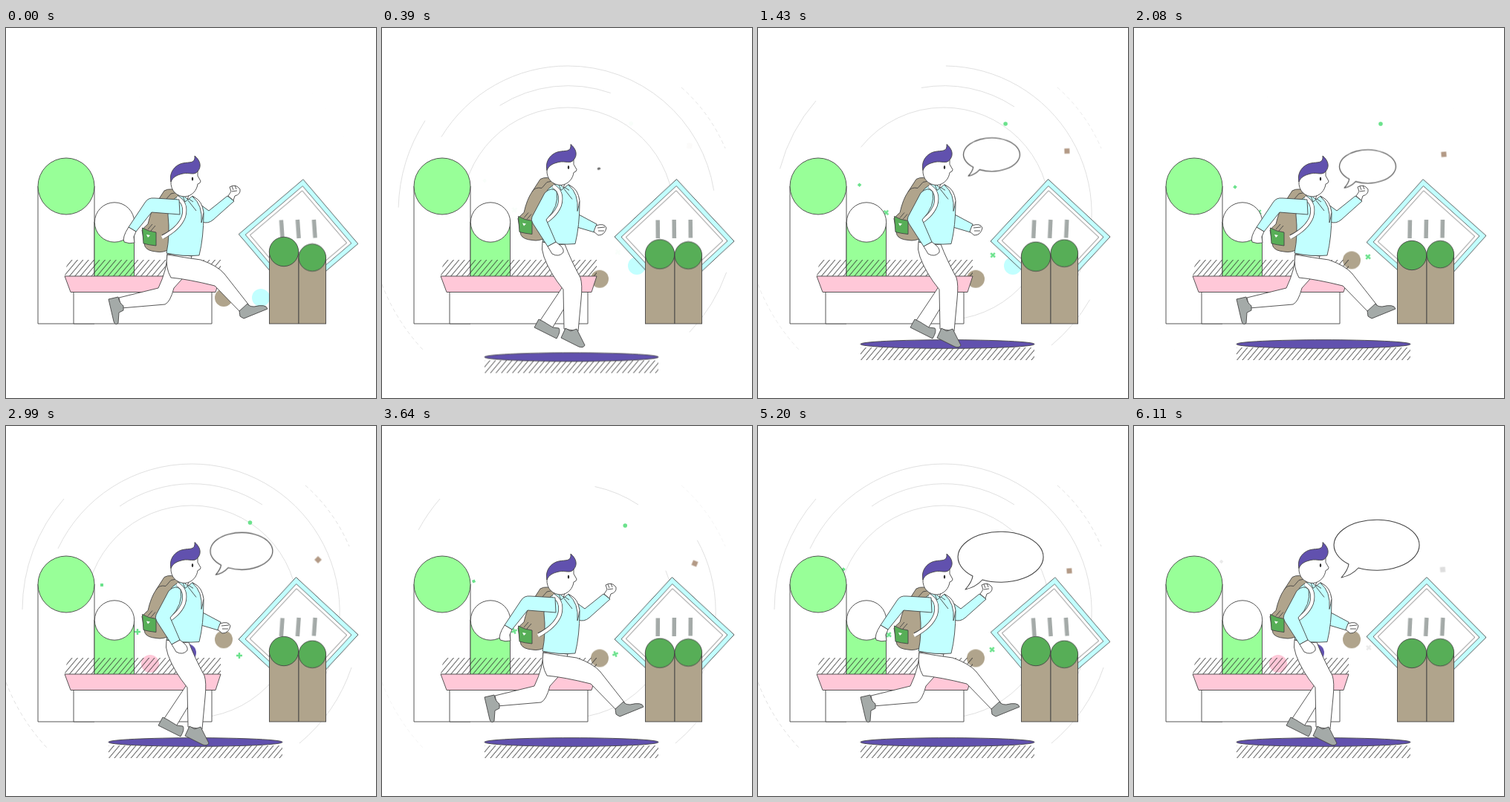
Animation, 498 px wide and 498 px high, one loop 6240 ms. Source, as an HTML page without scripts:

```html
<!DOCTYPE html>
<html lang="en">
<head>
<meta charset="utf-8">
<title>Runner</title>
<style>
html, body { margin: 0; width: 100%; height: 100%; overflow: hidden; background: #fff; }
svg { display: block; width: 498px; height: 498px; }
.ink { stroke: #444; stroke-width: .9; stroke-linejoin: round; fill: #fff; }
.ink path, .ink use { vector-effect: non-scaling-stroke; }
.mint { fill: #98ff98; }
.leaf { fill: #57ae57; }
.tan { fill: #b0a48c; }
.sky { fill: #c2ffff; }
.pink { fill: #ffc8d8; }
.plum { fill: #6151ae; }
.grey { fill: #a4aaa8; }
.none { fill: none; }

/* run cycle: four held poses */
.pose { visibility: hidden; animation: pose 520ms step-end infinite; }
.p2 { animation-delay: -390ms; }
.p3 { animation-delay: -260ms; }
.p4 { animation-delay: -130ms; }
@keyframes pose { 0% { visibility: visible } 25%, 100% { visibility: hidden } }
.bob { animation: bob 520ms step-end infinite; }
@keyframes bob {
  0%, 50%, 100% { transform: none }
  25% { transform: translateY(-30px) }
  75% { transform: translateY(-16px) }
}
.talk { stroke-width: 1.1; transform-origin: 291px 206px; animation: talk 6240ms linear infinite; }
@keyframes talk {
  0%, 6% { transform: scale(0) }
  12.5%, 42% { transform: scale(.66) }
  47.9%, 53% { transform: scale(.73) }
  58%, 75% { transform: scale(0) }
  81%, 100% { transform: scale(1) }
}

.ball { animation: hop 1040ms steps(4) 260ms infinite; }
.hide { animation-name: peek; animation-timing-function: steps(2); }
@keyframes hop { 50% { transform: translateY(var(--h)) } }
@keyframes peek { 25%, 75% { transform: translateY(-86px) } }

.rings { fill: none; stroke: #ddd; stroke-width: .9; }
.arc { stroke-dasharray: 0 2; animation: draw 2080ms linear infinite; }
@keyframes draw {
  0% { stroke-dasharray: 0 2; stroke-dashoffset: -.15; opacity: 0 }
  1% { opacity: 1 }
  6.25% { stroke-dasharray: .28 2; stroke-dashoffset: -.1 }
  25%, 62% { stroke-dasharray: 1 2; stroke-dashoffset: 0 }
  81% { stroke-dasharray: 0 2; stroke-dashoffset: -1; opacity: 1 }
  82%, 100% { stroke-dasharray: 0 2; stroke-dashoffset: -1; opacity: 0 }
}
.dash { stroke-dasharray: 5 4; animation: fade 2080ms linear infinite; }
@keyframes fade { 0%, 82%, 100% { opacity: 0 } 6.25% { opacity: .6 } 25%, 62% { opacity: 1 } }

.marks { animation: marks 6240ms linear infinite; }
@keyframes marks {
  0%, 6% { opacity: 0 }
  12%, 92% { opacity: 1; filter: none }
  97.9% { opacity: .35; filter: grayscale(1) }
  100% { opacity: 0; filter: grayscale(1) }
}
.spin { animation: spin 6240ms linear infinite; }
@keyframes spin {
  0% { transform: rotate(60deg) }
  14.6% { transform: rotate(45deg) }
  33.3% { transform: rotate(40deg) }
  47.9% { transform: rotate(0deg) }
  68.75% { transform: rotate(-45deg) }
  83.3%, 100% { transform: rotate(-50deg) }
}

.ground { animation: rise 6240ms ease-out infinite; }
@keyframes rise {
  0%, 2% { transform: translateY(75px); opacity: 0 }
  2.1% { transform: translateY(60px); opacity: 1 }
  10.4%, 14.6% { transform: translateY(-2px) }
  20%, 100% { transform: none; opacity: 1 }
}
.kite { transform-origin: 393.5px 284px; animation: rock 6240ms linear infinite; }
@keyframes rock {
  0%, 83.3%, 100% { transform: rotate(4.6deg) }
  14.6% { transform: rotate(-1.2deg) }
  33.3% { transform: rotate(-3.2deg) }
  47.9%, 68.75% { transform: rotate(-2.2deg) }
  97.9% { transform: rotate(.3deg) }
}
.bar { animation: tilt 6240ms linear infinite; transform-box: fill-box; transform-origin: center; }
@keyframes tilt {
  0%, 83.3%, 100% { transform: rotate(-4deg) }
  14.6%, 47.9% { transform: rotate(4deg) }
  33.3% { transform: rotate(1deg) }
  68.75% { transform: rotate(-3deg) }
  97.9% { transform: rotate(3deg) }
}
.post { animation: post 6240ms linear infinite; }
@keyframes post {
  0%, 100% { transform: translateY(calc(var(--d) * -1)) }
  14.6% { transform: translateY(var(--d)) }
  33.3%, 97.9% { transform: translateY(calc(var(--d) * .25)) }
  47.9%, 83.3% { transform: translateY(calc(var(--d) * -.5)) }
  68.75% { transform: translateY(calc(var(--d) * .8)) }
}
</style>
</head>
<body>
<svg viewBox="0 0 498 498">
<defs>
  <clipPath id="base"><path d="M0,0H498V398H0Z"/></clipPath>
  <pattern id="hatch" width="7.4" height="40" patternUnits="userSpaceOnUse" patternTransform="skewX(-40)">
    <path d="M3,0V40" stroke="#333" stroke-width="1"/>
  </pattern>
  <path id="square" d="M0,-80.500L80.500,0L0,80.500L-80.500,0Z"/>
  <path id="plus" d="M-4,0H4M0,-4V4" stroke="#6be28c" stroke-width="2.4"/>

  <g id="body">
    <path class="tan" d="M202,236L213,219Q222,214 232,221L238,232L221,252V297Q212,303 202,301Q190,300 187,294L183,272Q188,266 191,264Q195,246 202,236Z"/>
    <path class="none" d="M202,236Q206,229 215,231L222,223L232,221M191,271L197,264M195,273L201,266"/>
    <path class="leaf" d="M183.500,269Q192,274 202,275V293Q192,292 185,290Z"/>
    <path d="M189,278L194,279L191,282Z" stroke="none"/>
    <path d="M232,220L231,230L243,234L247,222Z"/>
    <path class="sky" d="M229,228L237,224L245,231L251,226Q264,234 266,250Q266,282 260,306Q238,308 216,303Q221,278 218,252Q217,235 229,228Z"/>
    <path class="none" d="M237,224L241,234L246,230L252,234M245,232L256,246"/>
    <path class="none" stroke-width="6" d="M230,228Q244,236 239,254Q233,270 211,281"/>
    <path class="none" style="stroke:#fff" stroke-width="4.4" d="M230,228Q244,236 239,254Q233,270 210,282"/>
    <path d="M251,227Q265,238 263,262Q265,255 266,248Q264,233 254,228Z"/>
    <path d="M222,206C221,219 230,227 241,227C251,226 257,218 258,210Q262,209 262,206L258,199V190H228Z"/>
    <path class="plum" d="M222,207C219,194 228,184 238,182C247,180 255,183 254,172C261,178 264,186 258,193C253,199 247,194 238,196C230,198 225,200 222,207Z"/>
    <ellipse cx="251" cy="203" rx="1.200" ry="2.600" fill="#333" stroke="none"/>
  </g>
  <g id="legBack">
    <path d="M217,304Q217,325 205,350L152,363L155,377L214,372Q221,369 226,350L244,330L250,307Z"/>
    <path class="grey" d="M138,365L151,362Q153,371 158,374V380L152,383L151,397Q147,401 145,395Z"/>
  </g>
  <g id="legFront">
    <path d="M217,305Q240,309 262,312Q285,320 294,331L327,373L317,384L281,347Q245,338 222,336Q214,322 217,305Z"/>
    <path class="grey" d="M314,381L325,371Q327,375 334,375Q350,371 352,378L320,391L315,388Z"/>
  </g>
  <g id="armBack">
    <path class="sky" d="M233,231L200,229Q191,228 187,235L165,268L175,274L196,248L234,251Z"/>
    <path d="M165,268Q156,282 159,288Q166,291 173,289L172,281L175,274Z"/>
  </g>
  <g id="armFront">
    <path class="sky" d="M262,238L273,246L298,226L307,233L279,258Q272,264 264,261Z"/>
    <path d="M299,226L303,220L301,214Q309,209 315,217Q316,224 308,226L306,232Z"/>
    <path class="none" d="M304,213L306,218M308,212L310,217M304,220L311,219"/>
  </g>
</defs>

<g class="rings">
  <path class="arc" pathLength="1" d="M250,393A143,143 0 0 1 250,107A143,143 0 0 1 250,393"/>
  <path class="arc" pathLength="1" d="M153,108A172,172 0 0 1 345,106"/>
  <path class="arc" pathLength="1" d="M70,165A199,199 0 0 1 250,51A199,199 0 0 1 425,345"/>
  <path class="arc" pathLength="1" d="M22,247A228,228 0 0 1 78,98"/>
  <path class="arc" pathLength="1" d="M465,325A228,228 0 0 1 395,427"/>
  <path class="dash" d="M403,80A229,229 0 0 1 462,162"/>
  <path class="dash" d="M0,345A267,267 0 0 0 56,434"/>
</g>

<g class="marks">
  <circle r="2.800" fill="#6be28c">
    <animateMotion dur="6.24s" repeatCount="indefinite" calcMode="linear" keyTimes="0;.146;.333;.479;.688;.833;1" values="336,128;334,129;332,129;328.5,130;326,138;324,146;323,152"/>
  </circle>
  <g>
    <animateMotion dur="6.24s" repeatCount="indefinite" calcMode="linear" keyTimes="0;.146;.333;.479;.688;.833;1" values="139,203;137,209;136,214;129,214;118,204;115,193;118,181"/>
    <path class="spin" d="M-2,-2H2V2H-2Z" fill="#6be28c"/>
  </g>
  <g>
    <animateMotion dur="6.24s" repeatCount="indefinite" calcMode="linear" keyTimes="0;.146;.333;.479;.688;.833;1" values="180,242;176,249;168,248;177,277;179,275;176,281;168,283"/>
    <use href="#plus" class="spin"/>
  </g>
  <g>
    <animateMotion dur="6.24s" repeatCount="indefinite" calcMode="linear" keyTimes="0;.146;.333;.479;.688;.833;1" values="318,300;317,304;315,308;314,309;314,305;315,301;316,298"/>
    <use href="#plus" class="spin"/>
  </g>
  <g>
    <animateMotion dur="6.24s" repeatCount="indefinite" calcMode="linear" keyTimes="0;.146;.333;.479;.688;.833;1" values="413,156;415,162;417,170;420,180;422,190;419,195;415,193"/>
    <g class="spin"><path d="M-3.500,-3.500H3.500V3.500H-3.500Z" transform="rotate(45)" fill="#b39a86"/></g>
  </g>
</g>

<g class="ink">
  <path d="M43,213H119V398H43Z"/>
  <circle class="mint" cx="81" cy="213" r="38"/>
  <path class="mint" d="M119,261H172.500V340H119Z"/>
  <circle cx="146" cy="261.500" r="26.700"/>
</g>

<g clip-path="url(#base)">
  <circle class="ball tan" style="--h:-101px" cx="293" cy="363" r="12"/>
  <circle class="ball pink" style="--h:-100px" cx="194" cy="395" r="12"/>
  <circle class="ball plum" style="--h:-77px" cx="244" cy="363" r="12"/>
  <circle class="ball hide sky" cx="343" cy="363" r="12"/>
</g>

<path d="M83,312H289V334H79Z" fill="url(#hatch)"/>
<g class="ink">
  <path d="M91,350H277V398H91Z"/>
  <path class="pink" d="M79,334H289L282,355.500H87Z"/>
</g>

<g class="ink kite"><g transform="translate(393.5 284)">
  <use href="#square" class="sky"/>
  <use href="#square" transform="scale(.888)"/>
  <use href="#square" transform="scale(.81)"/>
</g></g>
<g class="grey">
  <path class="bar" d="M368.500,258.500H374V283H368.500Z"/>
  <path class="bar" d="M390.500,258H396V283H390.500Z"/>
  <path class="bar" d="M412.500,258H418V282.500H412.500Z"/>
</g>
<g class="ink" clip-path="url(#base)">
  <g class="post" style="--d:4px">
    <path class="tan" d="M354.500,305H394V410H354.500Z"/>
    <circle class="leaf" cx="374" cy="305" r="19.700"/>
  </g>
  <g class="post" style="--d:-3.500px">
    <path class="tan" d="M394,305.500H430.500V410H394Z"/>
    <circle class="leaf" cx="412.300" cy="305.500" r="18.300"/>
  </g>
</g>
<path class="ink" d="M354,398H431"/>

<g class="ground">
  <path d="M138,430H372V447H138Z" fill="url(#hatch)"/>
  <ellipse class="ink" style="fill:#6151ae" cx="255" cy="425.500" rx="117" ry="5.800"/>
</g>

<g class="bob"><g class="ink talk">
  <path d="M289,202Q288,210 279,220Q293,217 302,207A57.500,34 0 1 0 289,202Z"/>
</g></g>

<g class="ink">
  <g class="pose">
    <use href="#armFront"/>
    <use href="#legBack"/>
    <use href="#legFront"/>
    <use href="#body"/>
    <use href="#armBack"/>
  </g>

  <g class="pose p2">
    <path d="M238,274L257,274Q259,287 277,306Q281,312 280,322L277,378L260,378L258,325L243,312Z"/>
    <path class="grey" d="M258,376L277,375Q280,380 290,382Q293,388 288,389L256,388Z"/>
    <path d="M217,272Q214,302 219,338L190,387L203,394L241,344Q246,325 246,290L256,285V274Z"/>
    <path class="grey" d="M190,384L204,392Q202,399 207,413Q205,420 200,414L185,393Z"/>
    <use href="#body" y="-30"/>
    <path class="sky" d="M219,209Q230,200 241,208L242,243L268,262L264,272L226,255Q217,250 217,242Z"/>
    <path d="M268,262L281,261Q286,266 283,274L270,277L264,272Z"/>
  </g>

  <g class="pose p3">
    <use href="#armBack"/>
    <use href="#legFront"/>
    <use href="#legBack"/>
    <use href="#body"/>
    <path class="sky" d="M219,238Q230,229 241,238L248,256L289,240L294,250L248,274Q238,276 232,268Z"/>
    <path d="M289,240L296,232Q306,234 304,243L294,250Z"/>
  </g>

  <g class="pose p4">
    <path class="sky" d="M261,249L289,264L286,275L259,267Z"/>
    <path d="M288,266Q299,262 302,269Q300,279 291,279L285,274Z"/>
    <path class="none" d="M290,269L300,268M291,273L299,273"/>
    <path d="M225,310L244,347L212,395L229,404L246,376L254,325Z"/>
    <path class="grey" d="M211,392L217,395L230,403L238,404Q241,408 235,418L205,403Z"/>
    <path d="M216,288Q236,293 246,291Q254,312 267,336Q270,345 268,365L264,408L245,405L244,352Q226,330 218,308Q214,298 216,288Z"/>
    <path class="grey" d="M247,404L254,408L262,405L273,427Q271,431 265,429L241,417Z"/>
    <use href="#body" y="-15.500"/>
    <path class="sky" d="M219,222Q228,213 235,220Q239,240 221,258L234,288L223,294L203,263Q200,258 202,254Z"/>
    <path d="M223,294L234,288Q246,296 244,302Q238,309 229,304Z"/>
  </g>
</g>
</svg>
</body>
</html>
```
